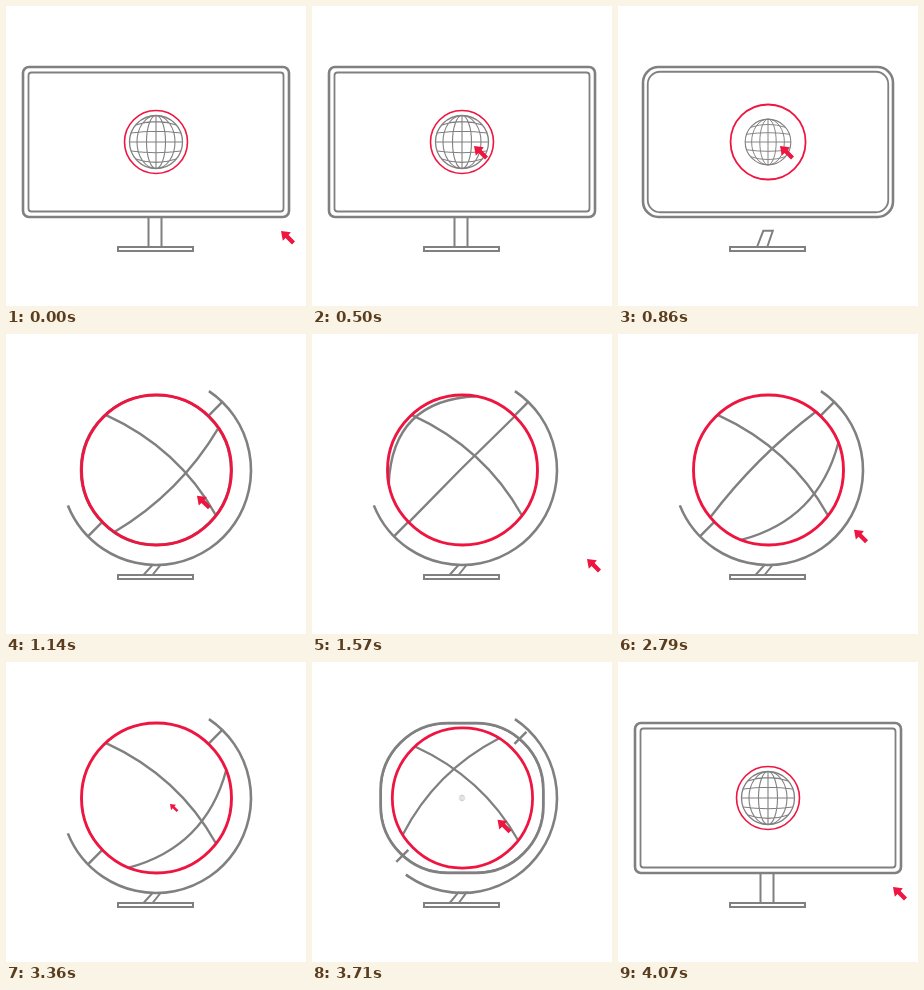
An HTML page with a canvas that plays this animation: 300 px wide and 300 px high, repeating every 4.14 s.

```html
<!DOCTYPE html>
<html lang="en">
<head>
<meta charset="utf-8">
<title>Monitor and globe</title>
<style>
  html, body { margin: 0; width: 100%; height: 100%; overflow: hidden; background: #fff; }
  canvas { display: block; width: 100vw; height: 100vh; }
</style>
</head>
<body>
<canvas id="stage" width="300" height="300"></canvas>
<script>
const ctx = document.getElementById('stage').getContext('2d');
const GRAY = '#808080', RED = '#ee1540';
const LOOP = 4140, STEP = LOOP / 58;
const CX = 150.5, CY = 136;
const R = 75, ARC_R = 95, TAU = Math.PI * 2;

// Times at which a meridian enters the large globe
const ENTRIES = [915, 1229, 1663, 2058, 2392, 2678, 3246];
const SPEED = 0.22;
const AXIS_SHIFT = -1.6;

const lerp = (a, b, p) => a + (b - a) * p;
const ramp = (t, start, end) => Math.min(1, Math.max(0, (t - start) / (end - start)));
const inOut = x => x < 0.5 ? 4 * x ** 3 : 1 - (2 - 2 * x) ** 3 / 2;
const out = x => 1 - (1 - x) ** 3;
const trip = (t, a, b, c, d) => inOut(ramp(t, a, b)) - inOut(ramp(t, c, d));
const pulse = (t, start, end) => Math.sin(Math.PI * ramp(t, start, end));

function stroke(color, width, path) {
  ctx.beginPath();
  path();
  ctx.strokeStyle = color;
  ctx.lineWidth = width;
  ctx.stroke();
}

// Runs paint in a frame whose vertical is the tilted axis of the globe
function tilted(scale, paint) {
  ctx.save();
  ctx.translate(CX, CY);
  ctx.rotate(Math.PI / 4);
  ctx.scale(scale, scale);
  paint();
  ctx.restore();
}

function drawMonitor(p) {
  if (p >= 1) return;
  const frame = (inset, width, corner) => {
    const w = lerp(133, R, p) - inset, h = R - inset;
    stroke(GRAY, width, () =>
      ctx.roundRect(CX - 0.5 - w, CY - h, w * 2, h * 2, lerp(corner, h, p)));
  };
  frame(0, 2.6, 6);
  frame(lerp(5.5, 0, p), 1.8, 3);
}

function drawStand(q) {
  const top = lerp(211, 231, q), shift = lerp(0, -5, q), lean = lerp(0, 9, q);
  stroke(GRAY, 2, () => {
    ctx.moveTo(142.5 + shift, 241);
    ctx.lineTo(142.5 + shift + lean, top);
    ctx.lineTo(155.5 + shift / 5, top);
    ctx.lineTo(155.5 + shift * 1.8, 241);
  });
  stroke(GRAY, 2, () => ctx.rect(112, 241, 75, 4));
}

function drawSmallGlobe(p) {
  const scale = 1 - p;
  if (scale < 0.02) return;
  const r = 26.5;
  ctx.save();
  ctx.translate(150, CY);
  ctx.scale(scale, scale);
  stroke(GRAY, 1.3, () => ctx.arc(0, 0, r, 0, TAU));
  stroke(GRAY, 1.1, () => {
    for (const rx of [9.5, 19]) {
      ctx.moveTo(rx, 0);
      ctx.ellipse(0, 0, rx, r, 0, 0, TAU);
    }
    ctx.moveTo(0, -r);
    ctx.lineTo(0, r);
    ctx.moveTo(-r, 0);
    ctx.lineTo(r, 0);
    for (const y of [-17, -9, 9, 17]) {
      const x = Math.sqrt(r * r - y * y);
      ctx.moveTo(-x, y);
      ctx.quadraticCurveTo(0, y * 1.4, x, y);
    }
  });
  ctx.restore();
}

function drawLargeGlobe(t, p, radius) {
  if (p < 0.4) return;
  tilted(radius / R, () => {
    ctx.globalAlpha = ramp(p, 0.4, 0.8);
    stroke(GRAY, 2.4, () => {
      ctx.moveTo(-75, -3);
      ctx.quadraticCurveTo(0, -31, 74, -10);
    });
    for (const entry of ENTRIES) {
      const mid = R - (t - entry) * SPEED + AXIS_SHIFT;
      if (Math.abs(mid) >= R) continue;
      const end = mid * 0.6, reach = Math.sqrt(R * R - end * end);
      stroke(GRAY, 2.4, () => {
        ctx.moveTo(end, -reach);
        ctx.quadraticCurveTo(2 * mid - end, 0, end, reach);
      });
    }
  });
}

function drawMount(p) {
  const grow = ramp(p, 0.25, 1);
  if (!grow) return;
  const start = -0.98, sweep = 3.74;
  stroke(GRAY, 2.6, () => ctx.arc(150, CY, ARC_R, start, start + sweep * grow));
  tilted(1, () => stroke(GRAY, 2.4, () => {
    for (const side of [-1, 1]) {
      ctx.moveTo(AXIS_SHIFT, side * R);
      ctx.lineTo(AXIS_SHIFT, side * lerp(R, ARC_R, grow));
    }
  }));
}

function drawCursor(t) {
  const p = trip(t, 50, 500, 950, 1430) + trip(t, 2585, 3035, 3540, 4000);
  const size = 1 - 0.4 * (pulse(t, 600, 740) + pulse(t, 3290, 3430));
  ctx.save();
  ctx.translate(lerp(275, 162, p) + 5, lerp(225, 140, p) + 5);
  ctx.scale(size, size);
  ctx.translate(-5, -5);
  ctx.beginPath();
  [[0, 0], [9.8, 1.2], [7.6, 4.1], [14, 10.5], [11, 13.5], [4.5, 7.1], [1.8, 9.8]]
    .forEach(([x, y]) => ctx.lineTo(x, y));
  ctx.closePath();
  ctx.fillStyle = RED;
  ctx.fill();
  ctx.restore();
}

function draw(t) {
  const forward = ramp(t, 710, 1160), back = ramp(t, 3560, 4060);
  const p = inOut(forward) - inOut(back);
  const radius = lerp(31.5, R, p);
  ctx.fillStyle = '#fff';
  ctx.fillRect(0, 0, 300, 300);
  drawStand(out(forward - back));
  drawMonitor(p);
  drawMount(p);
  drawSmallGlobe(p);
  drawLargeGlobe(t, p, radius);
  stroke(RED, lerp(1.6, 2.9, p), () => ctx.arc(lerp(150, CX, p), CY, radius, 0, TAU));
  drawCursor(t);
}

const began = performance.now();
function tick() {
  const t = (performance.now() - began) % LOOP;
  draw(Math.floor((t + 2) / STEP) % 58 * STEP);
  requestAnimationFrame(tick);
}
tick();
</script>
</body>
</html>
```
